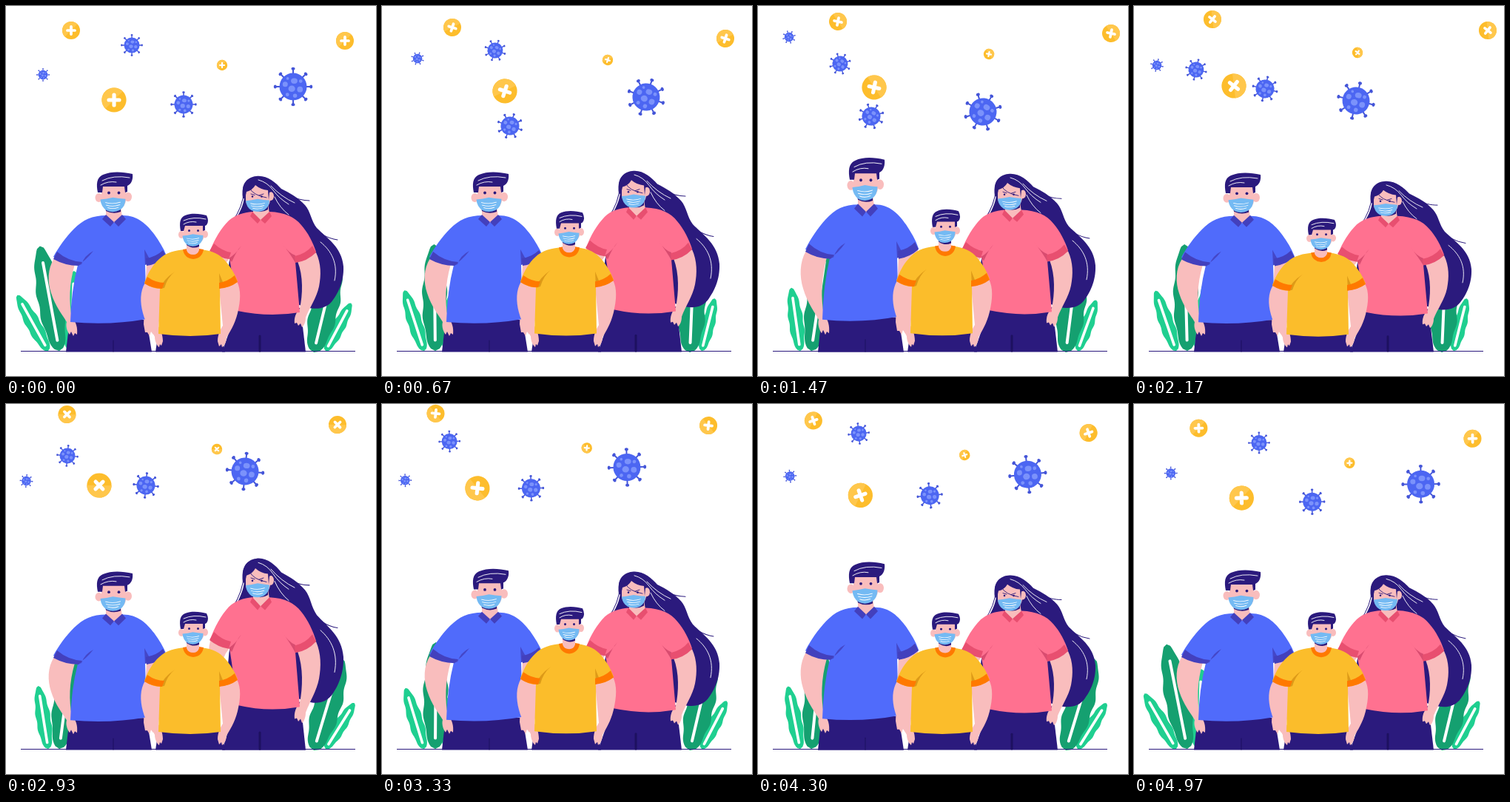
Write an HTML page with a canvas that moves like this. It is 500 px wide and 500 px high and loops after 5010 ms.

```html
<!DOCTYPE html>
<html lang="en">
<head>
<meta charset="utf-8">
<title>Masked family</title>
<style>
html, body { margin: 0; width: 100%; height: 100%; overflow: hidden; background: #fff; }
canvas { display: block; width: 100vw; height: 100vh; }
</style>
</head>
<body>
<canvas id="stage" width="500" height="500"></canvas>
<script>
const ctx = document.getElementById('stage').getContext('2d');
const LOOP = 5010, GROUND = 467, RAD = Math.PI / 180;
const NAVY = '#2b1a7d', SKIN = '#f9bdbd', WHITE = '#fff';
const LEAF = '#1fcf90', DARK_LEAF = '#15a070';

// Smooth periodic curve through (times, vals)
function curve(times, vals, t, period) {
  const n = times.length;
  t = ((t % period) + period) % period;
  const time = i => times[(i + n) % n] + Math.floor(i / n) * period;
  const val = i => vals[(i + n) % n];
  const slope = i => (val(i + 1) - val(i - 1)) / (time(i + 1) - time(i - 1));
  let i = 0;
  while (i < n - 1 && times[i + 1] <= t) i++;
  const h = time(i + 1) - time(i), s = (t - time(i)) / h, r = 1 - s;
  return val(i) * (1 + 2 * s) * r * r + slope(i) * h * s * r * r +
    val(i + 1) * s * s * (3 - 2 * s) - slope(i + 1) * h * s * s * r;
}

const DRIFT = [0, 670, 1470, 2170, 2930, 3730];
const drift = (vals, t) => curve(DRIFT, vals, t, LOOP);

const viruses = [
  { r: 18.5, x: [388, 357, 304, 300, 323, 340], y: [109, 123, 143, 128, 91, 87] },
  { r: 10.5, x: [170, 153, 111, 84, 83, 105], y: [53, 60, 78, 86, 70, 36] },
  { r: 12.5, x: [240, 173, 153, 177, 189, 214], y: [133, 162, 149, 112, 110, 119] },
  { r: 6.3, x: [50, 48, 42, 31, 27.5, 36.5], y: [93, 71, 42, 80, 104, 99] }
];
const pluses = [
  { r: 12, x: [88, 95, 108, 106, 82.5, 68], y: [33, 29, 21, 18, 14, 14] },
  { r: 16.6, x: [146, 166, 157, 135, 126, 134], y: [127, 115, 110, 108, 110, 118] },
  { r: 7.2, x: [292, 305, 312, 302, 285, 273], y: [80, 73, 65, 63, 61, 60] },
  { r: 12, x: [458, 464, 477, 478, 448, 440], y: [47, 44, 37, 33, 28, 32] }
];

// Body stretch, two beats per loop
const BEAT = LOOP / 2;
const BEAT_KEYS = [0, 425, 670, 1225, 1470, 2170];
const stretch = {
  man: [1, 0.992, 1, 1.033, 1.08, 0.996],
  boy: [1, 1, 1.02, 1.07, 1.032, 0.968],
  woman: [1, 1.089, 1.03, 0.992, 1.013, 0.97]
};

const paths = {};
const path = d => paths[d] || (paths[d] = new Path2D(d));
function fill(color, d) { ctx.fillStyle = color; ctx.fill(path(d)); }
function line(color, width, d) {
  ctx.strokeStyle = color;
  ctx.lineWidth = width;
  ctx.lineCap = 'round';
  ctx.stroke(path(d));
}
function dot(color, x, y, rx, ry = rx) {
  ctx.fillStyle = color;
  ctx.beginPath();
  ctx.ellipse(x, y, rx, ry, 0, 0, 7);
  ctx.fill();
}

function virus(x, y, r, deg) {
  const stem = 0.08 + 0.5 / r;
  ctx.save();
  ctx.translate(x, y);
  ctx.rotate(deg * RAD);
  ctx.scale(r, r);
  for (let i = 0; i < 8; i++) {
    ctx.rotate(45 * RAD);
    ctx.fillStyle = '#4455d8';
    ctx.fillRect(-stem / 2, -1.32, stem, 0.4);
    dot('#4455d8', 0, -1.31, 0.14, 0.11);
  }
  dot('#4c66f2', 0, 0, 1);
  const spot = '#7b92fb';
  dot(spot, 0.08, -0.42, 0.24, 0.2);
  dot(spot, -0.1, 0.15, 0.25, 0.23);
  dot(spot, 0.5, 0.2, 0.21);
  dot(spot, -0.58, -0.18, 0.19);
  dot(spot, 0.55, -0.4, 0.13);
  dot(spot, -0.42, 0.58, 0.13);
  dot(spot, 0.14, 0.66, 0.15);
  dot(spot, -0.4, -0.6, 0.1);
  ctx.restore();
}

function plus(x, y, r, deg) {
  ctx.save();
  ctx.translate(x, y);
  ctx.scale(r, r);
  ctx.rotate(deg * RAD);
  dot('#fdbd2c', 0, 0, 1);
  ctx.fillStyle = '#ffc74c';
  ctx.beginPath();
  ctx.arc(0, 0, 1, 135 * RAD, 315 * RAD);
  ctx.fill();
  line(WHITE, 0.31, 'M-.42 0H.42M0 -.42V.42');
  ctx.restore();
}

// Scalloped leaf rising from its base
function leaf(color, x, y, len, half, deg) {
  ctx.save();
  ctx.translate(x, y);
  ctx.rotate(deg * RAD);
  const steps = 48;
  const width = s => half * Math.pow(Math.sin(Math.PI * s), 0.42) *
    (1.12 - 0.2 * s + 0.07 * Math.sin(s * 25));
  ctx.beginPath();
  ctx.moveTo(0, 0);
  for (let i = 1; i < steps; i++) ctx.lineTo(-width(i / steps), -len * i / steps);
  ctx.lineTo(0, -len);
  for (let i = steps - 1; i > 0; i--) ctx.lineTo(width(i / steps), -len * i / steps);
  ctx.closePath();
  ctx.fillStyle = color;
  ctx.fill();
  ctx.strokeStyle = WHITE;
  ctx.lineWidth = half > 14 ? 4 : 3.6;
  ctx.lineCap = 'round';
  ctx.beginPath();
  ctx.moveTo(0, -len * 0.1);
  ctx.lineTo(0, -len * 0.84);
  ctx.stroke();
  ctx.restore();
}

function plants(t) {
  const left = curve([0, 400, 670, 1085, 1470, 2170, 2500, 2930, 3730, 4300, 4830],
    [0, 19, 11, 4, 21, 10, 5, 20, 4, 18, 1], t, LOOP);
  leaf(LEAF, 88, 466, 108, 14, 2 + left * 0.8);
  leaf(LEAF, 57, 466, 86, 9.5, -29 + left);
  leaf(DARK_LEAF, 72, 466, 144, 16, -10.5 + left * 0.9);

  const right = curve([0, 300, 670, 1470, 2170, 2930, 3730, 4280, 4830],
    [27, 31, 13, 19, 13, 31, 21, 31, 28], t, LOOP);
  leaf(LEAF, 432, 466, 73, 8.5, right + 1);
  leaf(DARK_LEAF, 416, 468, 130, 18, right * 0.8 - 8);
}

function mask(x, y, w, h) {
  ctx.save();
  ctx.translate(x, y);
  ctx.scale(w, h);
  fill('#74baf3', 'M-1 -.72Q-.5 -.78 0 -1Q.5 -.85 1 -.78Q1 .25 .55 .75Q0 1.2 -.5 .78Q-.95 .3 -1 -.72Z');
  line(WHITE, 0.085, 'M-.58 -.3Q0 -.02 .58 -.34M-.52 .06Q0 .34 .54 .02M-.4 .42Q0 .66 .42 .38');
  ctx.restore();
}

function person(scale, draw) {
  ctx.save();
  ctx.translate(0, GROUND);
  ctx.scale(1, scale);
  ctx.translate(0, -GROUND);
  draw();
  ctx.restore();
}

function man() {
  fill(NAVY, 'M87 424H190L197 467.6H81Q83 445 87 424Z');
  line('#1d1060', 1, 'M145 452V467');
  fill(SKIN, 'M65 341C56 355 56 373 61 388C67 407 77 418 82 427C80 434 84 442 86 444L88 440L91 446L93 442L96 444C97 435 95 427 89 421C85 400 85 376 93 349Z');
  fill(SKIN, 'M190 347L216 339C216 355 210 372 203 390L197 421C199 431 202 440 199 444L196 440L194 446L191 441L188 441L186 430Z');
  fill('#506bfb', 'M136 283H158C178 283 190 295 200 308C207 318 213 327 217 338Q204 349 188 349L190 423Q140 432 87 427Q88 385 97 350Q78 348 64 339C71 326 81 312 92 301C104 289 116 283 136 283Z');
  fill('#4447c8', 'M118 331Q106 337 102 349L96 351Q108 344 118 331ZM187 329L197 347L188 350Z');
  fill('#4340bd', 'M69 332Q84 345 103 346L98 351Q80 351 64 342ZM189 341Q203 339 212 330L217 339Q205 349 190 351Z');
  fill(SKIN, 'M135 270H155L157 285L146 293L135 284Z');
  fill('#4340bd', 'M135 282L130 288L141 298L146 292ZM157 282L162 288L152 298L146 292Z');
  fill(NAVY, 'M134 272H155V278Q145 282 135 277Z');
  dot(SKIN, 125.5, 259, 5, 6);
  dot(SKIN, 165, 258, 5, 6.2);
  fill(SKIN, 'M129 239H162V263Q160 275 145 276Q129 274 129 258Z');
  fill(NAVY, 'M124 252C122 241 122 232 131 228C143 223 157 224 171 227C172 235 169 241 164 243V251L161 252L160 244H131L130 252Z');
  line(WHITE, 0.9, 'M130 236Q145 228 167 232M128 242Q138 236 149 238');
  dot(NAVY, 139, 252.5, 1.9);
  dot(NAVY, 152.5, 252.5, 1.9);
  mask(144.5, 268.5, 17, 9.8);
}

function boy() {
  fill(NAVY, 'M206 441H290L296 467.6H202Z');
  fill(SKIN, 'M188 374C181 386 181 400 185 415C189 431 198 440 201 447C201 454 205 460 207 461L208 457L210 459L212 453C212 445 209 437 206 433L213 380Z');
  fill(SKIN, 'M312 372C318 384 317 398 313 415C309 431 302 441 298 448C298 455 294 460 292 461L291 457L288 460L286 453C286 445 289 438 293 432L288 381Z');
  fill('#fbbd2b', 'M242 329H264C280 331 289 336 296 344C303 352 309 361 313 372Q303 381 289 381L290 443Q250 449 206 443L208 382Q197 382 187 374C192 360 199 349 207 342C216 333 229 330 242 329Z');
  fill('#dd9a18', 'M228 359Q218 367 214 381L208 382Q212 370 228 359ZM288 361L295 378L289 382Z');
  fill('#ff7900', 'M191 366Q202 374 214 374L211 382Q198 382 187 375ZM288 374Q300 372 309 364L313 373Q302 381 288 382Z');
  fill('#ff7900', 'M239 329Q241 341 253 342Q265 341 267 329L261 328H245Z');
  fill(SKIN, 'M244 318H261V330Q259 336 253 336Q246 336 244 330Z');
  fill(NAVY, 'M244 319H261V325Q253 329 244 323Z');
  dot(SKIN, 237, 309, 4, 5);
  dot(SKIN, 269, 308.5, 4, 5);
  fill(SKIN, 'M240 293H268V310Q266 322 253 323Q240 321 240 309Z');
  fill(NAVY, 'M236 304C234 293 235 286 242 283C251 279 264 281 271 283Q275 291 271 296L269 297V303L266 304V297H242L240 304Z');
  line(WHITE, 0.9, 'M240 290Q253 284 270 288M240 295Q248 290 257 292');
  dot(NAVY, 247.5, 303.5, 1.5);
  dot(NAVY, 259.5, 303.5, 1.5);
  mask(252.5, 316.5, 14, 8.3);
}

function woman() {
  fill(NAVY, 'M322 258C316 243 325 231 338 230C352 228 364 238 372 247C384 253 395 259 404 269C412 278 412 290 420 300C434 314 454 326 456 352C457 373 448 389 442 397C434 409 420 411 406 407L300 375Q299 345 308 320L310 289C315 280 321 270 322 258Z');
  line(NAVY, 1, 'M322 248Q320 272 306 291M360 238C375 254 391 263 410 263M410 294Q427 313 448 316');
  fill(NAVY, 'M313 408H398L405 467.6H292Z');
  line('#1d1060', 3, 'M343 446V466');
  fill(SKIN, 'M277 328Q271 348 276 375L288 375Q291 353 302 341Z');
  fill(SKIN, 'M419 333C426 348 426 364 423 379C420 394 410 408 405 421C405 428 402 433 400 434L398 429L395 432L393 428L390 429C389 421 392 414 397 409C401 390 402 365 394 345Z');
  fill('#ff7190', 'M333 278H356C377 279 390 285 399 296C408 306 415 320 419 332Q406 344 391 346L397 414Q355 421 313 412Q308 376 302 341Q288 340 276 330C282 315 290 301 301 290C310 282 321 279 333 278Z');
  fill('#d94c70', 'M318 324Q312 330 305 346L301 341Q311 335 318 324ZM373 321Q382 334 391 337V347Q385 336 373 321Z');
  fill('#e84f70', 'M281 321Q292 331 304 333L301 342Q287 340 275 331ZM390 338Q405 335 414 324L419 333Q407 345 391 347Z');
  fill(SKIN, 'M334 268H354L356 280L344 290L334 280Z');
  fill('#e84f70', 'M333 278L330 284L340 294L344 289ZM356 278L359 284L350 294L344 289Z');
  fill(NAVY, 'M333 270H354V275Q344 281 333 275Z');
  dot(SKIN, 357.5, 257, 4.5, 6);
  fill(SKIN, 'M324 247Q326 238 338 237Q356 239 357 252V263Q355 275 341 276Q324 273 324 262Z');
  fill(NAVY, 'M320 260Q317 239 330 233Q350 227 363 249L356 252L355 262L354 249Q344 248 337 242Q333 249 325 251L323 260Z');
  line(NAVY, 0.9, 'M329 246Q334 256 352 259M331 254L336 255.5M342 256L348 254');
  dot(NAVY, 333, 257.5, 1.3);
  dot(NAVY, 345.5, 257.5, 1.3);
  line(WHITE, 0.9, 'M341 235Q353 238 361 249T382 268M363 258Q370 273 382 282M358 243Q372 258 390 266M425 319C440 331 449 348 444 371');
  mask(340, 269.5, 16, 8.8);
}

function draw(t) {
  ctx.fillStyle = WHITE;
  ctx.fillRect(0, 0, 500, 500);

  const spin = drift([0, 19, 29, 13, 5, -6], t);
  for (const v of viruses) virus(drift(v.x, t), drift(v.y, t), v.r, spin);
  // One full turn per loop, with an uneven pace
  const turn = 360 * t / LOOP + drift([0, -30, -4, -28, 15, 48], t);
  for (const p of pluses) plus(drift(p.x, t), drift(p.y, t), p.r, turn);

  plants(t);
  ctx.fillStyle = NAVY;
  ctx.fillRect(20, 466, 452, 1);
  const scale = who => curve(BEAT_KEYS, stretch[who], t, BEAT);
  person(scale('woman'), woman);
  person(scale('man'), man);
  person(scale('boy'), boy);
}

const start = performance.now();
function frame() {
  draw((performance.now() - start) % LOOP);
  requestAnimationFrame(frame);
}
draw(0);
requestAnimationFrame(frame);
</script>
</body>
</html>
```
